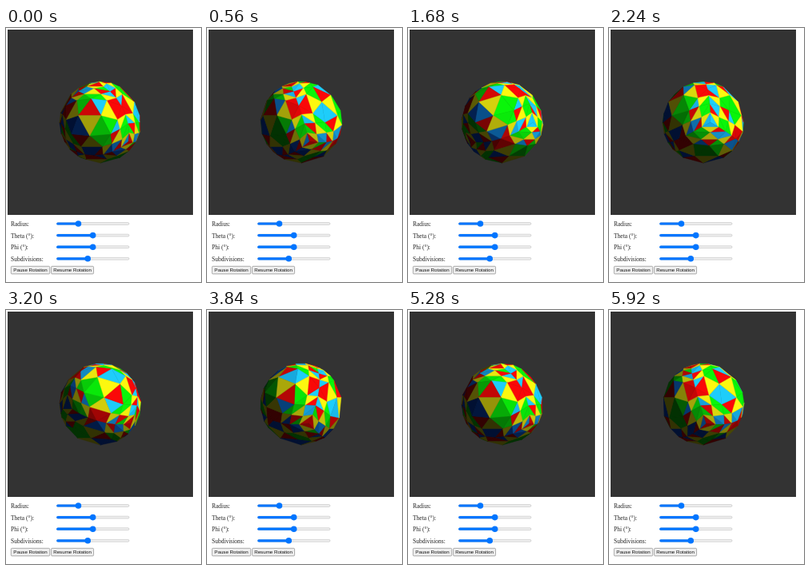
Animation, 244 px wide and 318 px high, one loop 6000 ms. Source, as an HTML page with a canvas:

```html
<!DOCTYPE html>
<html>
<head>
<meta charset="utf-8">
<style>
html, body { margin: 0; width: 100%; height: 100%; overflow: hidden; background: #fff; }
canvas, svg { position: absolute; left: 0; top: 0; }
.label { font: 7.5px "Liberation Serif", "Times New Roman", serif; fill: #222; }
.button { font: 6.2px "Liberation Sans", Arial, sans-serif; fill: #111; text-anchor: middle; }
</style>
</head>
<body>
<canvas id="view" width="244" height="236"></canvas>
<svg id="panel" width="244" height="318"></svg>
<script>
const ctx = document.getElementById('view').getContext('2d');
const CENTER = 118, RADIUS = 51, STEP = 80, LOOP = 6000;
const LEVELS = 3, TURN_PER_STEP = 5.5, START_ANGLE = -16;

// Controls below the view
const sliders = [['Radius:', 90.5], ['Theta (°):', 108.7], ['Phi (°):', 108.7], ['Subdivisions:', 102.3]];
const buttons = [['Pause Rotation', 6.3, 48.4], ['Resume Rotation', 56.6, 53]];
document.getElementById('panel').innerHTML =
  sliders.map(([name, x], i) => {
    const y = 245 + i * 14.6;
    return `<text class="label" x="6" y="${y + 3.2}">${name}</text>
      <rect x="63.5" y="${y - 1.4}" width="90.5" height="2.8" rx="1.4" fill="#efefef" stroke="#b2b2b2" stroke-width=".5"/>
      <rect x="63.2" y="${y - 1.6}" width="${x - 63.2}" height="3.2" rx="1.6" fill="#0075ff"/>
      <circle cx="${x}" cy="${y}" r="3.8" fill="#0075ff"/>`;
  }).join('') +
  buttons.map(([name, x, w]) =>
    `<rect x="${x}" y="298.3" width="${w}" height="9.6" rx="1.2" fill="#efefef" stroke="#767676" stroke-width=".6"/>
     <text class="button" x="${x + w / 2}" y="305.3">${name}</text>`).join('');

// Sphere: a tetrahedron divided recursively, four colours in turn
const triangles = [];
const unit = v => v.map(n => n / Math.hypot(...v));
const middle = (a, b) => unit(a.map((n, i) => n + b[i]));

function divide(a, b, c, level) {
  if (!level) return triangles.push([a, b, c]);
  const ab = middle(a, b), bc = middle(b, c), ac = middle(a, c);
  divide(a, ab, ac, level - 1);
  divide(ab, b, bc, level - 1);
  divide(bc, c, ac, level - 1);
  divide(ab, bc, ac, level - 1);
}

const a = [0, 0, -1];
const b = [0, 0.942809, 0.333333];
const c = [-0.816497, -0.471405, 0.333333];
const d = [0.816497, -0.471405, 0.333333];
divide(a, b, c, LEVELS);
divide(d, c, b, LEVELS);
divide(a, d, b, LEVELS);
divide(a, c, d, LEVELS);

const paints = [
  k => [30 * k * k, 205 * k ** 1.6, 250 * k],
  k => [250 * k, 8 * k, 8 * k],
  k => [10 * k, 245 * k, 10 * k],
  k => [252 * k, 248 * k, 15 * k]
];
const light = unit([1, 1, 1]);

function draw(time) {
  const step = Math.floor(time % LOOP / STEP);
  const angle = (START_ANGLE - step * TURN_PER_STEP) * Math.PI / 180;
  const cos = Math.cos(angle), sin = Math.sin(angle);
  const turn = ([x, y, z]) => [x * cos + z * sin, y, z * cos - x * sin];

  ctx.clearRect(0, 0, 244, 236);
  ctx.fillStyle = '#333';
  ctx.fillRect(2, 2, 232, 232);
  ctx.lineWidth = 0.4;
  ctx.lineJoin = 'round';

  triangles.forEach((triangle, i) => {
    const [p, q, r] = triangle.map(turn);
    const facing = (q[0] - p[0]) * (r[1] - p[1]) - (q[1] - p[1]) * (r[0] - p[0]);
    const normal = unit(p.map((n, j) => n + q[j] + r[j]));
    if (normal[2] < -0.3 || Math.abs(facing) < 1e-6) return;
    // Skip faces whose plane points away from the viewer
    const u = q.map((n, j) => n - p[j]), v = r.map((n, j) => n - p[j]);
    const cross = [u[1] * v[2] - u[2] * v[1], u[2] * v[0] - u[0] * v[2], facing];
    const outward = cross[0] * normal[0] + cross[1] * normal[1] + cross[2] * normal[2];
    if (facing * outward < 0) return;

    const lit = normal[0] * light[0] + normal[1] * light[1] + normal[2] * light[2];
    const shade = Math.min(1, 0.2 + 1.1 * Math.max(0, lit));
    ctx.fillStyle = ctx.strokeStyle = `rgb(${paints[i % 4](shade).map(Math.round)})`;
    ctx.beginPath();
    for (const [x, y] of [p, q, r]) ctx.lineTo(CENTER + RADIUS * x, CENTER - RADIUS * y);
    ctx.closePath();
    ctx.fill();
    ctx.stroke();
  });
}

const start = performance.now();
function tick() {
  draw(performance.now() - start);
  requestAnimationFrame(tick);
}
tick();
</script>
</body>
</html>
```
